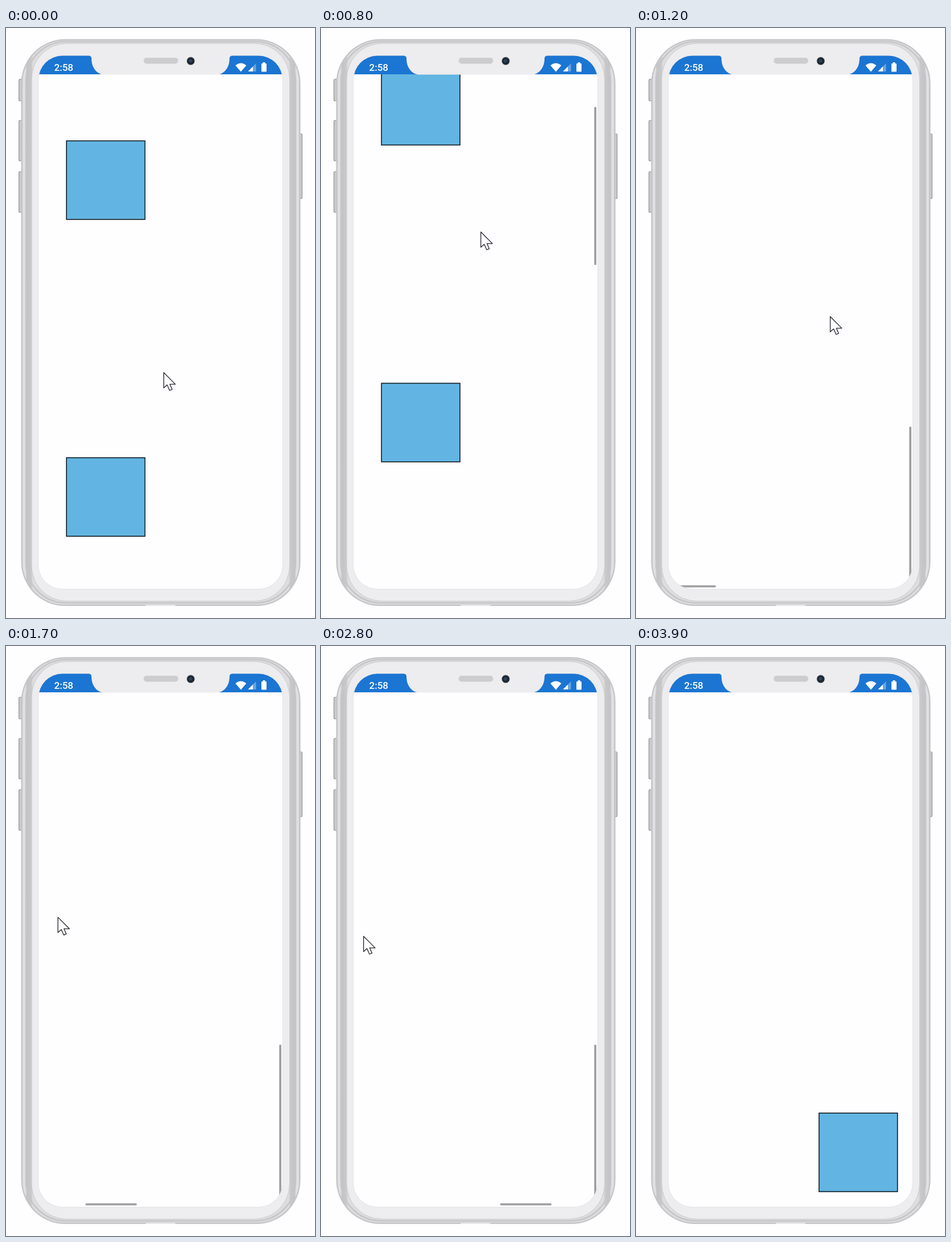
Recreate the animation shown at these times as an HTML page. Size 542 by 1032 pixels, loop 4 s.

```html
<!DOCTYPE html>
<html lang="en">
<head>
<meta charset="utf-8">
<title>Two-way scrolling</title>
<style>
  html, body { margin: 0; width: 100%; height: 100%; overflow: hidden; background: #fefdff; }
  svg { display: block; width: 100%; height: 100%; }
  .clock { font: 500 17px Roboto, sans-serif; fill: #fff; }
  .box { fill: #62b5e2; stroke: #0e1a22; stroke-width: 1.6; }
  .key { fill: #cacacb; stroke: #98989a; stroke-width: 1.2; }
  .thumb { fill: #000; fill-opacity: .37; }
</style>
</head>
<body>
<svg viewBox="0 0 542 1032" preserveAspectRatio="none">
  <defs>
    <clipPath id="screen"><rect x="57" y="48.5" width="428" height="932.5" rx="42"/></clipPath>
    <clipPath id="view"><rect x="57" y="81" width="428" height="900"/></clipPath>
    <linearGradient id="side" x2=".5" spreadMethod="reflect">
      <stop offset="0" stop-color="#cfcfcf"/>
      <stop offset=".012" stop-color="#e2e2e3"/>
      <stop offset=".028" stop-color="#dededf"/>
      <stop offset=".036" stop-color="#c2c3c4"/>
      <stop offset=".068" stop-color="#c9c9ca"/>
      <stop offset=".08" stop-color="#dddddf"/>
    </linearGradient>
  </defs>

  <g class="key">
    <rect x="22.6" y="89.5" width="8" height="38" rx="2"/>
    <rect x="22.6" y="161.5" width="8" height="71" rx="2"/>
    <rect x="22.6" y="251" width="8" height="71.5" rx="2"/>
    <rect x="511" y="185" width="8.4" height="113.5" rx="2"/>
  </g>
  <rect x="27.8" y="20.8" width="487.5" height="989" rx="76" fill="url(#side)" stroke="#c6c6c8" stroke-width="2.5"/>
  <rect x="35" y="24" width="473" height="981.5" rx="70" fill="none" stroke="#c6c6c8" stroke-width="2.5"/>
  <rect x="45" y="27" width="452.5" height="975.5" rx="62" fill="#edecee" stroke="#cacacc"/>
  <rect x="245" y="1009" width="52" height="2" fill="#e9e9ea"/>
  <rect x="56.5" y="48.5" width="429" height="933" rx="42.5" fill="#fefdff" stroke="#e3e2e4"/>

  <g clip-path="url(#screen)">
    <g clip-path="url(#view)">
      <g id="page">
        <rect class="box" x="106.1" y="197.4" width="137.6" height="137.4"/>
        <rect class="box" x="106.1" y="751.6" width="137.6" height="137.4"/>
        <rect class="box" x="1944.1" y="2767" width="137.6" height="137.4"/>
      </g>
      <rect id="vbar" class="thumb" x="479.2" width="3.8" height="276.5" rx="1.5"/>
      <rect id="hbar" class="thumb" y="974.8" width="90" height="3.6" rx="1.5"/>
    </g>
    <rect x="57" y="48" width="428" height="33" fill="#1b75d2"/>
    <text class="clock" x="84.5" y="75">2:58</text>
    <g fill="#fff">
      <path d="M402.5 65.5Q412 57.5 421.5 65.5L412 76.5Z"/>
      <path d="M438.5 62V76H424.5Z" opacity=".35"/>
      <path d="M433 67.5V76H424.5Z"/>
      <path d="M450.5 62V60H454.5V62H456Q457 62 457 63V75.5Q457 76.5 456 76.5H449Q448 76.5 448 75.5V63Q448 62 449 62Z"/>
    </g>
  </g>

  <path d="M146 47V48.5Q150 49 150 54C150 67 157 79 170 81.5H372C385 79 392 67 392 54Q392 49 396 48.5V47Z" fill="#edecee"/>
  <rect x="241.5" y="52" width="60.5" height="10.5" rx="5" fill="#cdccce"/>
  <circle cx="324" cy="57.8" r="7" fill="#1d2631" stroke="#b5b6b9" stroke-width=".8"/>
  <circle cx="323.5" cy="57.5" r="3" fill="#2d4257"/>

  <path id="arrow" d="M-.3-.2V26.6L5.6 21.3 10 31 14.4 29.1 10.4 20.1H20Z" fill="#fefdff" stroke="#22222b" stroke-width="1.3" stroke-linejoin="round"/>
</svg>
<script>
const LOOP = 4000, TICK = 100;
const $ = id => document.getElementById(id);
const page = $('page'), vbar = $('vbar'), hbar = $('hbar'), arrow = $('arrow');

// turning points of the hand: time, x, y
const hand = [
  [0, 277, 603], [600, 277, 597], [900, 282, 273], [1200, 341, 505], [1650, 88, 474],
  [2350, 319, 515], [2650, 100, 474], [2800, 75, 508], [3450, 186, 515]
];

const progress = (t, from, to) => Math.min(1, Math.max(0, (t - from) / (to - from)));
const smooth = u => u * u * (3 - 2 * u);
const smoother = u => u ** 3 * (u * (6 * u - 15) + 10);
const mix = (a, b, u) => a + (b - a) * u;

// a swipe whose speed dies away
const flick = (t, from) => 1 - (1 - progress(t, from, from + 1220)) ** 2.32;

const move = (el, x, y) => el.setAttribute('transform', `translate(${x} ${y})`);

function moveHand(t) {
  const next = hand.findIndex(p => p[0] > t);
  const b = hand.at(next), a = next > 0 ? hand[next - 1] : b;
  const u = smooth(progress(t, a[0], b[0] + (a === b)));
  move(arrow, mix(a[1], b[1], u), mix(a[2], b[2], u));
  arrow.style.visibility = t < 3700 ? 'visible' : 'hidden';
}

function draw(t) {
  const y = 1950 * smoother(progress(t, 693, 1200));
  const x = 707 * flick(t, 1300) + 916 * flick(t, 2400);
  const alpha = 1 - progress(t, 3400, 3600);
  move(page, -x, -y);
  move(vbar, 0, 98 + y * .3073);
  move(hbar, 50 + x * .21, 0);
  vbar.style.opacity = t >= 700 ? alpha : 0;
  hbar.style.opacity = t >= 1200 ? alpha : 0;
  moveHand(t);
}

const start = performance.now();
function loop(now) {
  const t = Math.max(0, now - start) % LOOP;
  draw(Math.floor(t / TICK) * TICK);
  requestAnimationFrame(loop);
}
draw(0);
requestAnimationFrame(loop);
</script>
</body>
</html>
```
